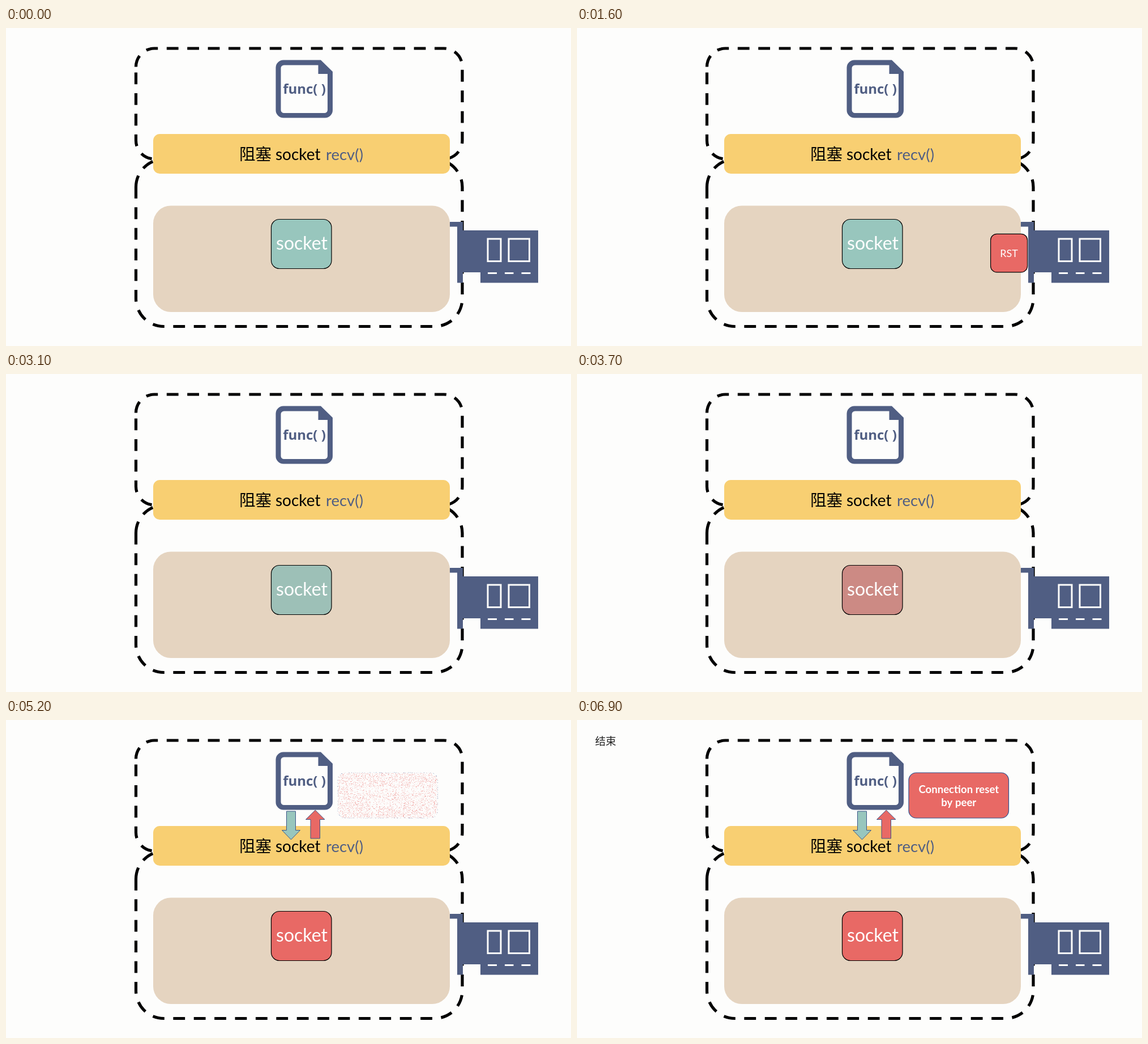
An HTML page with a canvas that plays this animation: 998x561 px, repeating every 7000 ms.

```html
<!DOCTYPE html>
<html lang="zh-CN">
<head>
<meta charset="utf-8">
<title>Socket RST</title>
<style>
  html, body { margin: 0; width: 100%; height: 100%; overflow: hidden; background: #fdfdfc; }
  svg, canvas { position: absolute; left: 0; top: 0; }
  canvas { left: 580px; top: 88px; }
  text { font-family: Lato, "Noto Sans CJK SC", "Noto Sans CJK", sans-serif; }
  .dash { fill: none; stroke: #000; stroke-width: 5.2; stroke-dasharray: 20.8 15.6; }
  .slate { fill: #505e83; }
  .line { fill: none; stroke: #fdfdfc; stroke-width: 3; }
  .edge { stroke: #000; stroke-width: 1.2; }
  .arrow { stroke: #3b5688; stroke-width: 1; }
  .label { fill: #fff; text-anchor: middle; }
</style>
</head>
<body>
<svg width="998" height="561" viewBox="0 0 998 561">
  <defs>
    <clipPath id="downClip"><rect id="downWipe" x="480" y="160" width="45" height="0"/></clipPath>
    <clipPath id="upClip"><rect id="upWipe" x="525" y="210" width="45" height="0"/></clipPath>
  </defs>

  <path class="dash" d="M229.5 68.5a32.5 32.5 0 0 1 32.5-32.5H773.5a32.5 32.5 0 0 1 32.5 32.5V198.5a32.5 32.5 0 0 1-32.5 32.5H262a32.5 32.5 0 0 1-32.5-32.5Z"/>
  <path class="dash" d="M229.5 280.7a49.2 49.2 0 0 1 49.2-49.2H756.8a49.2 49.2 0 0 1 49.2 49.2V477.3a49.2 49.2 0 0 1-49.2 49.2H278.7a49.2 49.2 0 0 1-49.2-49.2Z"/>

  <rect x="260" y="187" width="524" height="70" rx="11.7" fill="#f8cf72"/>
  <rect x="260" y="313.5" width="524" height="187.5" rx="31.2" fill="#e5d4c0"/>

  <path class="slate" fill-rule="evenodd" d="M490 56.5H556L577 77V145a13.5 13.5 0 0 1-13.5 13.5H490a13.5 13.5 0 0 1-13.5-13.5V70a13.5 13.5 0 0 1 13.5-13.5ZM491 65.5a5.5 5.5 0 0 0-5.5 5.5V144.500a5.500 5.500 0 0 0 5.500 5.500H562.500a5.500 5.500 0 0 0 5.500-5.500V81H551.500V65.500Z"/>
  <text class="slate" x="527" y="116" text-anchor="middle" style="font:700 24px 'Open Sans','Noto Sans',sans-serif">func( )</text>

  <path class="slate" d="M784 342H807V357H940V449.500H838V431H807V449.500H797V350.500H784Z"/>
  <path class="line" d="M851 372H874V411.500H851ZM888 372H924.500V411.500H888ZM851 432.500h16m14 0h15.500m14 0h16"/>

  <rect id="socket" class="edge" x="468.500" y="337.500" width="106.500" height="87" rx="14.500"/>
  <text class="label" x="522.500" y="391" font-size="32">socket</text>

  <path class="arrow" clip-path="url(#downClip)" fill="#98c6bd" d="M495.500 161H511.500V194.500H519.500L503.500 211L487.500 194.500H495.500Z"/>
  <path class="arrow" clip-path="url(#upClip)" fill="#e86965" d="M538 209H554.500V175.500H563L546.300 159L529.500 175.500H538Z"/>

  <text x="412" y="233" font-size="28.5">阻塞</text>
  <text x="476" y="233" font-size="28">socket</text>
  <text class="slate" x="565" y="233" font-size="27.5">recv()</text>

  <g id="rst">
    <rect class="edge" x="-32.500" y="-33.800" width="65" height="67.600" rx="11" fill="#e86965"/>
    <text class="label" y="7" font-size="18">RST</text>
  </g>
  <text id="end" x="32" y="43.500" font-size="18.600" fill="#222">结束</text>
</svg>
<canvas id="error" width="190" height="92"></canvas>
<script>
const LOOP = 7000, STEP = 100;
const $ = id => document.getElementById(id);
const clamp = v => Math.min(1, Math.max(0, v));
const span = (t, from, to) => clamp((t - from) / (to - from));
const ease = u => u < .5 ? 2 * u * u : 1 - 2 * (1 - u) ** 2;
const mix = (a, b, u) => a + (b - a) * u;
const noise = i => {
  const v = Math.sin(i * 12.9898 + 4.1) * 43758.5453;
  return v - Math.floor(v);
};

const GREEN = [152, 198, 189], RED = [232, 105, 101];
const ctx = $('error').getContext('2d', { willReadFrequently: true });
let lastStep = -1;

// Error box, its pixels appearing in random order.
function drawError(p) {
  ctx.clearRect(0, 0, 190, 92);
  if (!p) return;
  ctx.beginPath();
  ctx.roundRect(6, 5, 176.5, 80, 13.3);
  ctx.fillStyle = '#e86965';
  ctx.fill();
  ctx.strokeStyle = '#2f528f';
  ctx.lineWidth = 1.2;
  ctx.stroke();
  ctx.font = '700 18.6px Lato, sans-serif';
  ctx.textAlign = 'center';
  ctx.fillStyle = '#fff';
  ctx.fillText('Connection reset', 94.3, 41);
  ctx.fillText('by peer', 94.3, 64);
  if (p === 1) return;
  const img = ctx.getImageData(0, 0, 190, 92);
  for (let i = 3; i < img.data.length; i += 4)
    img.data[i] *= clamp((p * 1.5 - noise(i)) / .5);
  ctx.putImageData(img, 0, 0);
}

function draw(t) {
  const move = ease(span(t, 650, 2650));
  $('rst').setAttribute('transform', `translate(${mix(949, 537, move)} ${mix(403.6, 389.2, move)})`);
  $('rst').style.opacity = span(t, 60, 560) * (1 - span(t, 2600, 3080));

  const tint = span(t, 3030, 4070);
  $('socket').style.fill = `rgb(${GREEN.map((c, i) => Math.round(mix(c, RED[i], tint)))})`;

  $('downWipe').setAttribute('height', 53 * span(t, 4080, 4580));
  const up = 53 * span(t, 4580, 5080);
  $('upWipe').setAttribute('y', 211 - up);
  $('upWipe').setAttribute('height', up);

  drawError(span(t, 5100, 5600));
  $('end').style.opacity = span(t, 5640, 6640);
}

function tick() {
  const step = Math.floor(performance.now() % LOOP / STEP);
  if (step !== lastStep) draw((lastStep = step) * STEP);
  requestAnimationFrame(tick);
}
tick();
</script>
</body>
</html>
```
